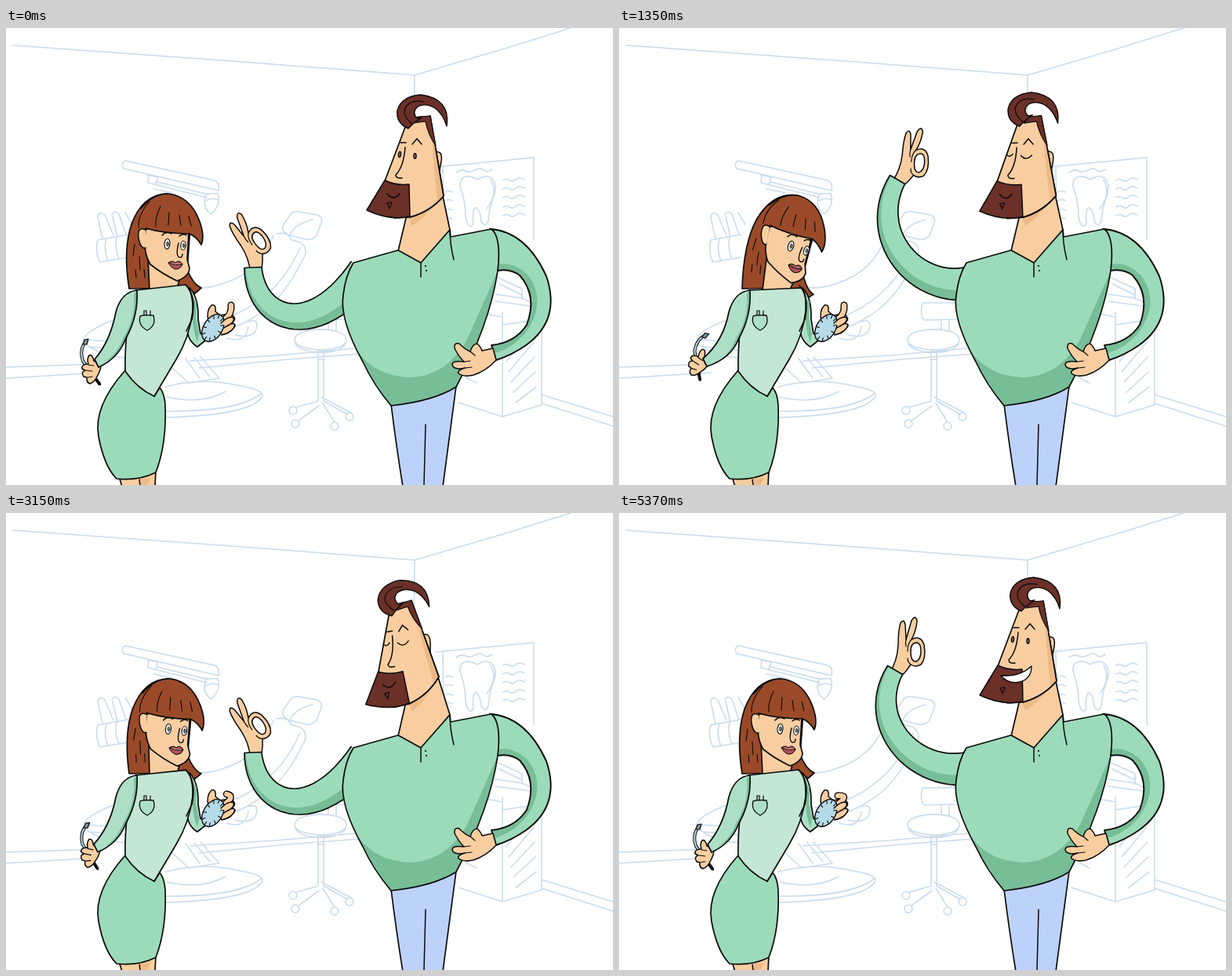
Animation, 774 px wide and 582 px high, one loop 5400 ms. Source, as an HTML page with a canvas:

```html
<!DOCTYPE html>
<html lang="en">
<head>
<meta charset="utf-8">
<title>Dental check</title>
<style>
html, body { margin: 0; width: 100%; height: 100%; overflow: hidden; background: #fff; }
canvas { display: block; width: 774px; height: 582px; }
</style>
</head>
<body>
<canvas id="stage" width="774" height="582"></canvas>
<script>
const ctx = document.getElementById('stage').getContext('2d');
const LOOP = 5400;
const INK = '#0b0b0b', SKIN = '#f8cea1', TAN = '#edb985', MINT = '#9cdbb9', MOSS = '#77bd96',
  PALE = '#c4e6d5', SLEEVE = '#addfc6', RUST = '#9a4a28', MAROON = '#6b3028', DENIM = '#bdd2fb',
  ICE = '#b7dae8', SKETCH = '#cadcec';

function shape(d, fill, line = 1.7, rule = 'nonzero') {
  const p = new Path2D(d);
  if (fill) { ctx.fillStyle = fill; ctx.fill(p, rule); }
  if (line) { ctx.strokeStyle = INK; ctx.lineWidth = line; ctx.stroke(p); }
}
function stroke(d, color, width) {
  ctx.strokeStyle = color;
  ctx.lineWidth = width;
  ctx.stroke(new Path2D(d));
}
function oval(x, y, rx, ry, turn, fill, line = 1.3) {
  ctx.beginPath();
  ctx.ellipse(x, y, rx, ry, turn, 0, 7);
  if (fill) { ctx.fillStyle = fill; ctx.fill(); }
  if (line) { ctx.strokeStyle = INK; ctx.lineWidth = line; ctx.stroke(); }
}
function turned(x, y, angle, draw) {
  ctx.save();
  ctx.translate(x, y);
  ctx.rotate(angle);
  ctx.translate(-x, -y);
  draw();
  ctx.restore();
}
function spin(px, py, a) {
  const c = Math.cos(a), s = Math.sin(a);
  return (x, y) => `${px + (x - px) * c - (y - py) * s} ${py + (x - px) * s + (y - py) * c}`;
}

// Smooth keyed value, flat at holds and turning points
function track(keys, t) {
  let i = 0;
  while (i < keys.length - 2 && t > keys[i + 1][0]) i++;
  const slope = k => {
    if (k < 1 || k > keys.length - 2) return 0;
    const [a, b, c] = [keys[k - 1], keys[k], keys[k + 1]];
    const m = (b[1] - a[1]) / (b[0] - a[0]), n = (c[1] - b[1]) / (c[0] - b[0]);
    return m * n <= 0 ? 0 : 2 * m * n / (m + n);
  };
  const [t0, v0] = keys[i], [t1, v1] = keys[i + 1], h = t1 - t0;
  const u = Math.min(1, Math.max(0, (t - t0) / h)), w = 1 - u;
  return v0 * (1 + 2 * u) * w * w + v1 * (3 - 2 * u) * u * u +
    slope(i) * h * u * w * w - slope(i + 1) * h * u * u * w;
}

// Shoulder, two bezier handles, wrist, hand angle
const POSES = {
  low: [457, 310, 390, 401, 318, 372, 315, 305, -.63],
  mid: [447, 328, 385, 350, 316, 300, 364, 243, .2],
  tall: [447, 325, 376, 338, 318, 264, 368, 193, .24],
  wave: [447, 325, 376, 337, 316, 262, 355, 193, .07],
  high: [447, 325, 376, 337, 316, 266, 363, 197, .17],
  rest: [447, 325, 376, 337, 314, 266, 352, 200, 0]
};
const ARM = [[0, 'low'], [430, 'low'], [640, 'mid'], [870, 'tall'], [1300, 'wave'], [1860, 'wave'],
  [2130, 'mid'], [2450, 'low'], [3560, 'low'], [3870, 'mid'], [4180, 'tall'], [4560, 'high'],
  [5370, 'rest']];
const NOD = [[0, 0], [450, .13], [640, .13], [870, .083], [1250, .02], [1860, .02], [2400, .18],
  [3900, .18], [4560, .02], [5370, 0]];
const CURL = [[0, 3], [870, 0], [1860, 0], [2520, 2], [3870, 2], [4560, 2], [5370, 0]];
const TURN = [[630, 0], [870, .4], [1170, 1], [2560, 1], [3300, 0]];
const WRIST = [[630, 0], [870, .78], [1170, 1], [2400, 1], [2520, .92], [3450, 0]];
const THUMB = [[2600, 0], [3450, 1]];
const GRIN = [[3200, 0], [3480, 1]];

const room = (() => {
  let d = `M9 22L300 43L521 60L640 25L720 0M521 60L520 180
  M0 432L118 428M0 446L118 439M235 424L345 417L445 408M246 433L360 422L452 415M683 467L774 495M683 478L774 507
  M152 169L266 194Q273 197 271 207L150 179Q146 172 152 169M180 187L194 190L191 199M182 187L181 197L256 216
  M188 205L212 210M193 196L258 212M255 211L270 211Q275 224 262 237Q249 230 255 211M254 220Q263 215 271 219
  M117 240Q119 232 126 238L137 264M117 241L123 268M135 238Q138 231 144 237L153 263M136 240L142 266M152 235L161 250
  M117 270Q113 286 120 298L156 292M117 270L156 263M128 268Q124 282 130 297M141 267Q138 278 144 294
  M363 237Q366 233 374 234L397 238Q404 241 402 248L396 264Q390 271 381 269L359 263Q350 258 354 250Z
  M362 264Q367 250 391 244M345 262Q360 259 364 270Q386 273 381 290Q352 350 315 369Q290 386 260 384
  M341 264Q324 312 275 326Q255 333 240 330M375 280Q350 337 298 362Q270 375 250 375
  M292 391Q318 397 320 379Q320 370 310 374M281 395Q306 403 309 380
  M152 367Q119 377 103 390Q94 401 107 406L152 410M101 397L152 400M107 406Q122 417 152 420
  M218 421L210 431L233 452L272 446L248 419M229 421L247 446M240 420L260 444
  M203 457Q250 444 300 456Q329 461 327 469Q313 493 203 496M203 488Q295 489 325 466M205 470Q250 480 280 463
  M368 397C368 380 434 379 434 397S368 413 368 397M369 402C378 417 426 417 433 402
  M388 350L432 350Q436 360 433 371L390 372Q384 370 386 353ZM411 373V384M421 373V386
  M398 410V475M405 410V475M397 422H406M398 475L370 483M399 481L373 500M404 478L419 502M405 475L435 492M402 470L440 490
  M548 177L673 165V270M557 177L558 258
  M579 202C578 184 594 189 601 193C617 183 627 194 623 211Q616 229 615 245Q612 256 606 246Q604 228 598 229Q594 236 596 249Q590 259 586 240Q586 220 579 202
  M618 194Q628 210 613 230M574 184q7 -5 12 -2t12 -1t11 0t11 -1
  M623 316L658 332V345M629 326L658 340M624 348L683 356V480L633 495L577 477M633 362V495M624 339L658 344L683 356M633 378L682 371M601 362L633 368M586 445L600 452`;
  for (const y of [194, 205, 216, 228, 239]) d += `M634 ${y}q4 -3 8 0t8 -1t11 0`;
  for (const y of [209, 220, 232, 243]) d += `M560 ${y}q4 -3 9 0`;
  for (let i = 0; i < 5; i++) d += `M${638 + i * 3} ${425 + i * 13}L${672 + i} ${381 + i * 19}`;
  for (const [x, y] of [[366, 487], [369, 504], [419, 507], [438, 495]]) d += `M${x + 5} ${y}a5 5 0 1 1 -10 0a5 5 0 1 1 10 0`;
  return d;
})();

function womanFace(turn) {
  ctx.save();
  ctx.translate(turn * 3.5, turn);
  stroke('M199 264Q204 258 211 262M221 265Q226 261 230 264', INK, 1.5);
  oval(205.5, 275, 3.5, 6.5, .1, '#fff', 1.1);
  oval(226, 277, 3.2, 5.8, .1, '#fff', 1.1);
  oval(206, 275, 1.5, 3, 0, '#64777c', .6);
  oval(226.5, 277, 1.4, 2.8, 0, '#64777c', .6);
  stroke('M220 274Q216 290 221 292Q225 293 225 288', INK, 1.4);
  shape('M207 299Q212 295 216 299Q221 294 225 301Q222 308 215 307Q210 305 207 299M208 299Q216 303 225 301', '#b1525e', 1);
  ctx.restore();
}

function woman(t) {
  const turn = track(TURN, t), hand = track(WRIST, t), thumb = track(THUMB, t);
  const a = turn * .19, r = spin(205, 330, a);

  shape('M144 571L148 584H190L191 564Z', SKIN);
  shape('M171 574L172 582H180L185 573Z', TAN, 0);
  stroke('M170 575L171 582', INK, 1.5);

  shape(`M157 332Q${r(149, 283)} ${r(160, 250)}Q${r(174, 212)} ${r(205, 211)}L${r(236, 240)}
    L${r(231, 308)}Q${r(239, 327)} ${r(249, 331)}L${r(241, 338)}Q${r(226, 326)} 214 331L157 332Z`, RUST);
  shape(`M${r(181, 290)}L183 334L218 333L${r(221, 320)}Z`, SKIN);
  turned(205, 330, a, () => {
    shape('M178 257Q174 285 184 301Q199 313 218 322Q233 317 234 306L231 295L233 260Q205 244 178 257', SKIN);
    shape('M178 257Q167 252 169 268Q172 282 178 280', SKIN, 1.5);
    womanFace(turn);
    shape('M178 256Q164 248 172 230Q187 211 207 211Q234 214 246 244Q254 264 249 276Q243 266 234 262Q202 262 178 256', RUST, 0);
    stroke('M172 230Q187 211 207 211Q234 214 246 244Q254 264 249 276Q243 266 234 262Q202 262 178 255', INK, 1.7);
    stroke('M197 227Q190 241 191 253M208 235L207 251M221 238L223 252M233 240L236 252M183 221Q168 238 169 254M164 275L162 290M170 291L171 308M165 308L166 318M176 307L177 318', INK, 1.1);
  });

  shape('M234 331Q246 343 245 371L248 389L258 395L244 406Q231 398 231 382Z', SLEEVE);
  shape('M238 345L243 348L242 370L246 389L244 400Q236 382 238 345', MOSS, 0);
  shape('M152 436Q111 482 118 520Q125 558 141 574Q169 577 191 566Q205 530 203 480Q202 465 196 458L189 469Z', MINT);
  shape(`M165 334L${229 + turn * 4} ${327 + turn * 4}Q239 336 238 361Q234 394 217 422L189 469Q167 459 152 437Q151 380 165 334`, PALE);
  stroke('M230 328Q243 342 237 371L230 386', INK, 1.7);
  shape('M171 367Q176 365 188 366Q192 379 180 385Q168 379 171 367', SLEEVE, 1.3);
  stroke('M176 366V360H179V366M184 366V360', INK, 1.2);

  const x = 116 - hand * 6, y = 430 - hand;
  ctx.save();
  ctx.translate(-6 * hand, -4 * hand);
  turned(118, 430, hand * .44, () => {
    const handle = 'M99 403Q94 412 98 424L119 453';
    stroke(handle, INK, 4);
    stroke(handle, ICE, 2);
    shape('M98 403L100 397L105 396L103 403Z', '#7896a3', 1.2);
    shape('M121 428L112 424Q110 415 106 417Q103 421 105 428Q96 428 97 434L101 436Q95 438 99 444L103 445Q102 451 107 453Q113 451 116 444Q121 436 121 429', SKIN, 1.5);
    stroke('M105 429L112 430M102 436L110 437M104 445L110 444', INK, 1.2);
    stroke('M115 448L120 454', INK, 2.5);
  });
  ctx.restore();
  shape(`M167 334Q147 336 140 362Q133 399 ${x - 3} ${y - 8}L${x + 2} ${y + 2}Q143 421 153 395Q169 366 167 334`, SLEEVE, 0);
  shape('M163 339Q166 368 150 394Q140 418 126 424Q142 420 153 395Q169 366 167 334Z', MOSS, 0);
  shape(`M167 334Q147 336 140 362Q133 399 ${x - 3} ${y - 8}L${x + 2} ${y + 2}Q143 421 153 395Q169 366 167 334`);

  shape('M258 373Q255 360 262 353Q268 351 267 361L273 366L285 364L290 367Q294 371 288 376Q295 377 289 383Q284 392 269 389L254 392Q247 386 258 373', SKIN, 1.5);
  const mix = (p, q) => p + (q - p) * thumb;
  const digit = `M280 370Q${mix(288, 294)} ${mix(364, 359)} ${mix(287, 279)} ${mix(353, 360)}`;
  stroke(digit, INK, 9);
  stroke(digit, SKIN, 6.2);
  turned(264, 382, .55, () => {
    oval(264, 382, 12, 19, 0, ICE, 1.4);
    for (let i = 0; i < 11; i++) {
      const b = i * 2 * Math.PI / 11, c = Math.cos(b), s = Math.sin(b);
      stroke(`M${264 + c * 11} ${382 + s * 18}L${264 + c * 8} ${382 + s * 14}`, INK, 1.1);
    }
  });
  shape('M274 376Q284 366 290 369Q293 374 281 380M278 382Q289 374 292 378Q290 387 275 391', SKIN, 1.4);
}

function waveArm(t) {
  const [sx, sy, ax, ay, bx, by, px, py, tilt] =
    POSES.low.map((_, i) => track(ARM.map(([time, name]) => [time, POSES[name][i]]), t));
  ctx.save();
  ctx.translate(px, py);
  ctx.rotate(tilt);
  shape(`M-7 4Q3 -12 4 -32Q4 -50 7 -60Q11 -66 13 -58L14 -39L21 -63Q26 -71 28 -63Q27 -50 21 -39
    Q33 -45 37 -32Q40 -15 33 -7Q26 -3 20 -7L15 0L7 9Z
    M28 -35Q20 -35 20 -24Q20 -10 27 -11Q33 -14 33 -24Q33 -34 28 -35Z`, SKIN, 1.5, 'evenodd');
  stroke('M14 -39Q13 -34 14 -30M21 -39Q16 -34 16 -24M20 -7Q16 -10 16 -15', INK, 1.2);
  ctx.restore();

  const inner = [], outer = [], band = [];
  for (let i = 0; i <= 26; i++) {
    const u = i / 26, v = 1 - u;
    const x = v * v * v * sx + 3 * v * v * u * ax + 3 * v * u * u * bx + u * u * u * px;
    const y = v * v * v * sy + 3 * v * v * u * ay + 3 * v * u * u * by + u * u * u * py;
    const dx = v * v * (ax - sx) + 2 * v * u * (bx - ax) + u * u * (px - bx);
    const dy = v * v * (ay - sy) + 2 * v * u * (by - ay) + u * u * (py - by);
    const n = Math.hypot(dx, dy), w = 21 - 10 * u;
    const at = k => `${x - dy / n * k} ${y + dx / n * k}`;
    inner.push(at(w));
    outer.push(at(-w));
    band.push(at(-w * (.38 + .45 * u * u)));
  }
  const ring = (p, q) => 'M' + p.concat([...q].reverse()).join('L');
  shape(ring(inner, outer) + 'Z', MINT, 0);
  shape(ring(band, outer) + 'Z', MOSS, 0);
  shape(ring(inner, outer));
}

function manHead(t) {
  const nod = -track(NOD, t), r = spin(525, 245, nod), grin = track(GRIN, t);
  const shut = t > 150 && t < 3200;
  shape(`M${r(511, 238)}L500 284L529 301L566 257L${r(557, 214)}Z`, SKIN);
  shape(`M${r(514, 242)}Q${r(538, 235)} ${r(548, 223)}Q534 242 518 252Z`, TAN, 0);

  turned(525, 245, nod, () => {
    shape('M548 158Q557 156 555 170L552 186', SKIN, 1.5);
    shape('M511 121L483 195L495 242L515 241Q541 234 558 214L541 112Z', SKIN);
    shape('M543 140L549 160L557 213L550 220Q545 170 543 140', TAN, 0);
    stroke('M515 241Q541 234 558 214L548 154', INK, 1.7);
    shape('M483 194Q498 201 514 199L515 240Q490 246 460 232Z', MAROON, 1.5);
    shape('M519 121L525 113L541 112L548 150Q538 136 535 119Z', MAROON, 1.2);
    stroke('M518 148L524 141L530 148M503 146L510 146M509 152Q507 177 497 187Q497 192 505 191', INK, 1.5);
    if (shut) {
      stroke('M496 161Q500 165 504 160M514 162Q520 170 528 162', INK, 1.4);
    } else {
      oval(502, 161, 1.6, 3.6, .1, '#7a695b', 1.3);
      oval(521.5, 163, 1.6, 3.3, 0, '#7a695b', 1.3);
    }
    stroke('M486 223L492 222L489 230Z', INK, 1.2);
    if (grin < .05) {
      stroke('M486 211Q494 221 502 211', INK, 1.5);
    } else {
      const tip = 488 + 38 * grin;
      shape(`M487 207Q${488 + 23 * grin} 209 ${tip} ${210 - 15 * grin}Q${tip} ${210 + 4 * grin}
        ${488 + 18 * grin} ${207 + 9 * grin}Q${488 + 6 * grin} ${207 + 9 * grin} 487 207`, '#fff', 1.3);
    }
    ctx.translate(0, track(CURL, t));
    shape('M513 125Q497 118 499 102Q504 84 529 82Q567 87 562 122Q557 106 547 99Q535 92 525 97Q517 104 524 112L530 111L519 119Z', MAROON, 1.4);
    stroke('M517 119Q502 105 512 95Q519 88 533 91', INK, 1.2);
  });
}

function man(t) {
  waveArm(t);
  shape('M491 479Q498 535 506 584H557L574 456Z', DENIM);
  stroke('M535 505L533 582', INK, 1.5);

  const outside = 'M617 256Q663 259 689 316Q708 372 663 404Q646 416 625 423L619 404';
  const inside = 'Q649 401 664 378Q678 341 655 315Q643 306 627 309';
  shape(outside + inside + 'Z', MINT, 0);
  shape('M627 301Q650 297 668 318Q690 352 661 390Q642 410 622 414L619 404' + inside + 'Z', MOSS, 0);
  stroke(outside + inside, INK, 1.9);

  manHead(t);

  const torso = 'M443 299L500 283L529 299L566 257L567 266L619 256Q632 267 627 309Q617 377 574 457Q546 475 491 481Q469 455 455 425Q425 371 430 340Q433 315 443 299Z';
  shape(torso, MINT, 0);
  shape('M449 412Q470 443 515 445Q561 444 588 397L627 309Q617 377 574 457Q546 475 491 481Q467 449 449 412', MOSS, 0);
  shape(torso);
  stroke('M529 299V317M566 257Q566 275 571 295', INK, 1.5);
  oval(535, 303, 1.1, 1.1, 0, INK, 0);
  oval(536, 309, 1.1, 1.1, 0, INK, 0);

  shape('M625 423Q612 437 596 442Q584 445 577 440Q575 436 585 433Q571 436 569 429Q569 423 584 425Q577 418 572 408Q571 400 578 402Q586 410 592 412Q595 402 601 402Q606 407 607 411L621 408Z', SKIN, 1.5);
  stroke('M584 425L592 424M585 433L594 432M592 412L598 417', INK, 1.2);
}

function frame(now) {
  const t = now % LOOP;
  ctx.fillStyle = '#fff';
  ctx.fillRect(0, 0, 774, 582);
  ctx.lineJoin = ctx.lineCap = 'round';
  stroke(room, SKETCH, 1.6);
  woman(t);
  man(t);
  requestAnimationFrame(frame);
}
requestAnimationFrame(frame);
</script>
</body>
</html>
```
